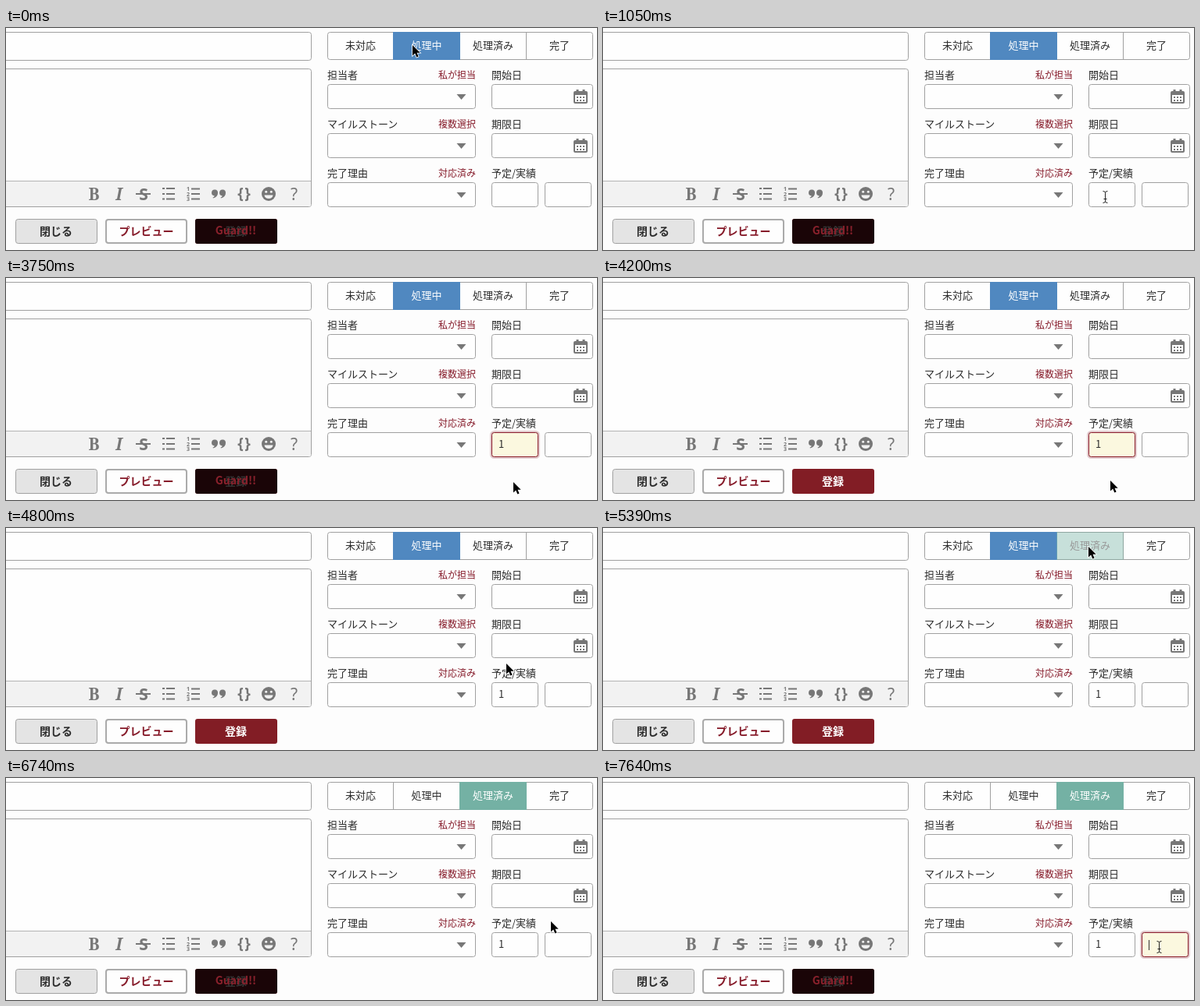
An HTML page that plays this animation: 756 by 285 pixels, repeating every 8000 ms.

```html
<!DOCTYPE html>
<html lang="ja">
<head>
<meta charset="utf-8">
<title>課題フォーム</title>
<style>
html, body { margin: 0; width: 100%; height: 100%; overflow: hidden; background: #fdfdfd; }
svg { display: block; width: 756px; height: 285px; }
text { font: 13px "Noto Sans CJK JP", "Noto Sans CJK", sans-serif; fill: #2c2c2c; }
.mid { text-anchor: middle; }
.link { font-size: 12px; fill: #861b2a; text-anchor: end; }
.btn { font-size: 14px; font-weight: 700; text-anchor: middle; }
.field { fill: #fefefe; stroke: #a0a0a0; }
.icons { fill: #777; stroke: none; }
.icons text { fill: #777; text-anchor: middle; }
.icons .serif { font: 700 21px "Noto Serif", serif; }
.icons .sans { font: 600 21px "Noto Sans", sans-serif; }
.icons .tiny { font: 700 7px "Noto Sans", sans-serif; }

/* Every change is a hard cut on one shared 8 s clock. */
.play { animation: 8s step-end infinite; }
#pointer { animation-name: move; }
#arrow { animation-name: arrow; }
#beam { animation-name: beam; }
#guard { animation-name: guard; }
#planFocus { animation-name: plan-focus; }
#planText { animation-name: plan-text; }
#planCaret { animation-name: plan-caret; }
#actualFocus { animation-name: actual-focus; }
#actualCaret { animation-name: actual-caret; }
#activeFill { animation-name: active-fill; }
#activeText { animation-name: active-text; }
#doneFill { animation-name: done-fill; }
#doneText { animation-name: done-text; }

@keyframes move {
  0% { transform: translate(520px, 22px); }
  7.5% { transform: translate(530px, 40px); }
  9.375% { transform: translate(586px, 128px); }
  11.25% { transform: translate(630px, 190px); }
  13.125% { transform: translate(642px, 217px); }
  43.125% { transform: translate(643px, 223px); }
  45% { transform: translate(648px, 245px); }
  46.875% { transform: translate(649px, 262px); }
  48.75% { transform: translate(649px, 269px); }
  50.625% { transform: translate(649px, 264px); }
  52.5% { transform: translate(649px, 260px); }
  60% { transform: translate(640px, 174px); }
  61.875% { transform: translate(629px, 76px); }
  63.75% { transform: translate(623px, 36px); }
  65.625% { transform: translate(621px, 24px); }
  67.5% { transform: translate(620px, 20px); }
  69.25% { transform: translate(620px, 18px); }
  80.5% { transform: translate(629px, 36px); }
  82.375% { transform: translate(664px, 112px); }
  84.25% { transform: translate(697px, 184px); }
  86.125% { transform: translate(708px, 211px); }
  88% { transform: translate(710px, 215px); }
  89.875%, 100% { transform: translate(711px, 217px); }
}
@keyframes arrow {
  0%, 45%, 100% { opacity: 1; }
  13.125%, 86.125% { opacity: 0; }
}
@keyframes beam {
  0%, 45%, 100% { opacity: 0; }
  13.125%, 86.125% { opacity: 1; }
}
@keyframes guard {
  0%, 73%, 100% { opacity: 1; }
  52.5% { opacity: 0; }
}
@keyframes plan-focus {
  0%, 54.375%, 100% { opacity: 0; }
  16.875% { opacity: .6; }
  18.75% { opacity: 1; }
}
@keyframes plan-text {
  0% { opacity: 0; }
  28.125%, 100% { opacity: 1; }
}
@keyframes plan-caret {
  0%, 22.5%, 33.75%, 46.875%, 100% { opacity: 0; transform: none; }
  16.875% { opacity: 1; transform: none; }
  28.125%, 41.25% { opacity: 1; transform: translateX(7px); }
}
@keyframes actual-focus {
  0% { opacity: 0; }
  93.625% { opacity: .6; }
  95.5%, 100% { opacity: 1; }
}
@keyframes actual-caret {
  0% { opacity: 0; }
  93.625%, 100% { opacity: 1; }
}
@keyframes active-fill {
  0% { opacity: 1; }
  73% { opacity: .8; }
  74.875%, 100% { opacity: 0; }
}
@keyframes active-text {
  0% { fill: #fff; }
  73% { fill: #c6d2df; }
  74.875%, 100% { fill: #2c2c2c; }
}
@keyframes done-fill {
  0% { opacity: 0; }
  65.625% { opacity: .4; }
  67.5% { opacity: .8; }
  73% { opacity: .86; }
  74.875%, 100% { opacity: 1; }
}
@keyframes done-text {
  0% { fill: #2c2c2c; }
  65.625% { fill: #999; }
  67.5%, 100% { fill: #fff; }
}
</style>
</head>
<body>
<svg viewBox="0 0 756 285">
  <defs>
    <g id="select">
      <rect class="field" x=".5" y=".5" width="189" height="31" rx="3"/>
      <path d="M165.500 13h12l-6 7z" fill="#777"/>
    </g>
    <g id="date">
      <rect class="field" x=".5" y=".5" width="129" height="31" rx="3"/>
      <g fill="none" stroke="#777" stroke-width="2">
        <rect x="106" y="10" width="16" height="14" rx="1"/>
        <path d="M106 12.500h16M110 7v5M118 7v5" stroke-width="3"/>
        <path d="M109 17h10M109 21h10" stroke-dasharray="2 2"/>
      </g>
    </g>
    <rect id="number" class="field" x=".5" y=".5" width="59" height="31" rx="3"/>
    <g id="focus" fill="none" stroke="#8b1c2b">
      <rect x="-.5" y="-.5" width="61" height="33" rx="4" stroke-width="3" opacity=".22"/>
      <rect x=".5" y=".5" width="59" height="31" rx="3" fill="#fbf8df"/>
    </g>
    <path id="quote" d="M8 4.200A4 4 0 1 0 3.800 8Q3.500 9.500 1.500 10.300L2 11Q8 9.500 8 4.200Z"/>
  </defs>

  <!-- editor -->
  <rect class="field" x="-9.500" y="5.500" width="400" height="36" rx="3"/>
  <rect class="field" x="-9.500" y="52.500" width="400" height="177" rx="3"/>
  <path d="M-1 197H390V227Q390 229 388 229H-1Z" fill="#f2f2f2"/>
  <path d="M0 196.500H390" stroke="#b4b4b4"/>
  <g class="icons">
    <text class="serif" x="112.500" y="220.500">B</text>
    <text class="serif" x="144.500" y="220.500" style="font-style:italic">I</text>
    <text class="sans" x="176" y="220.500">S</text>
    <path d="M166 212h19v2h-19z"/>
    <path d="M200 206h3m2 0h11M200 213h3m2 0h11M200 219.500h3m2 0h11M237 206.500h11M237 213h11M237 219.500h11" stroke="#777" stroke-width="2"/>
    <text class="tiny" x="233" y="209">1</text>
    <text class="tiny" x="233" y="215.500">2</text>
    <text class="tiny" x="233" y="222">3</text>
    <use href="#quote" x="263" y="207.500"/>
    <use href="#quote" x="273" y="207.500"/>
    <text class="sans" x="300" y="219" style="font-size:19px">{</text>
    <text class="sans" x="309" y="219" style="font-size:19px">}</text>
    <circle cx="336" cy="213" r="9"/>
    <g fill="#f2f2f2">
      <circle cx="332.700" cy="210.300" r="1.500"/>
      <circle cx="339.300" cy="210.300" r="1.500"/>
      <path d="M330.500 214.500h11a5.500 4.500 0 0 1-11 0z"/>
    </g>
    <text class="sans" x="368.500" y="220.500" style="font-weight:500">?</text>
  </g>

  <!-- buttons -->
  <rect x="12.500" y="245.500" width="104" height="31" rx="3" fill="#e4e4e4" stroke="#a0a0a0"/>
  <text class="btn" x="64" y="266">閉じる</text>
  <rect x="128" y="246" width="103" height="30" rx="3" fill="#fefefe" stroke="#aaa" stroke-width="2"/>
  <text class="btn" x="179.500" y="266" style="fill:#861b2a">プレビュー</text>
  <rect x="242" y="245" width="105" height="32" rx="3" fill="#821d25"/>
  <text class="btn" x="294" y="266" style="fill:#fff">登録</text>
  <g id="guard" class="play">
    <rect x="242" y="245" width="105" height="32" rx="3" fill="#000" opacity=".8"/>
    <text class="btn" x="294" y="265" style="fill:#8a212c">Guard!!</text>
  </g>

  <!-- status tabs -->
  <rect class="field" x="411.500" y="5.500" width="339" height="35" rx="3"/>
  <path d="M495.500 6v34M580.500 6v34M665.500 6v34" stroke="#a0a0a0"/>
  <rect id="activeFill" class="play" x="495" y="5" width="86" height="36" fill="#5088c0"/>
  <rect id="doneFill" class="play" x="580" y="5" width="86" height="36" fill="#74b1a4"/>
  <text class="mid" x="453.500" y="27">未対応</text>
  <text id="activeText" class="mid play" x="538" y="27">処理中</text>
  <text id="doneText" class="mid play" x="623" y="27">処理済み</text>
  <text class="mid" x="708" y="27">完了</text>

  <!-- details -->
  <text x="411" y="65">担当者</text>
  <text class="link" x="601" y="65">私が担当</text>
  <use href="#select" x="411" y="72"/>
  <text x="411" y="128">マイルストーン</text>
  <text class="link" x="601" y="128">複数選択</text>
  <use href="#select" x="411" y="135"/>
  <text x="411" y="191">完了理由</text>
  <text class="link" x="601" y="191">対応済み</text>
  <use href="#select" x="411" y="198"/>
  <text x="621" y="65">開始日</text>
  <use href="#date" x="621" y="72"/>
  <text x="621" y="128">期限日</text>
  <use href="#date" x="621" y="135"/>
  <text x="621" y="191">予定/実績</text>
  <use href="#number" x="621" y="198"/>
  <use href="#number" x="689" y="198"/>
  <g id="planFocus" class="play"><use href="#focus" x="621" y="198"/></g>
  <g id="actualFocus" class="play"><use href="#focus" x="689" y="198"/></g>
  <text id="planText" class="play" x="630" y="218">1</text>
  <rect id="planCaret" class="play" x="630" y="208" width="1" height="13" fill="#333"/>
  <rect id="actualCaret" class="play" x="698" y="208" width="1" height="13" fill="#333"/>

  <g id="pointer" class="play">
    <path id="arrow" class="play" d="M0 0V13.500L3.200 10.600L5.300 15.500L7.600 14.500L5.500 9.700H9.700Z" stroke="#fff" stroke-width="1.500" paint-order="stroke"/>
    <g id="beam" class="play" fill="none">
      <path id="beamLine" d="M-2.500 -7.500Q.5 -7.500 .5 -5.500V5.500Q.5 7.500 -2.500 7.500M3.500 -7.500Q.5 -7.500 .5 -5.500M.5 5.500Q.5 7.500 3.500 7.500M-1.500 2.500H2.500" stroke="#222"/>
    </g>
  </g>
</svg>
</body>
</html>
```
